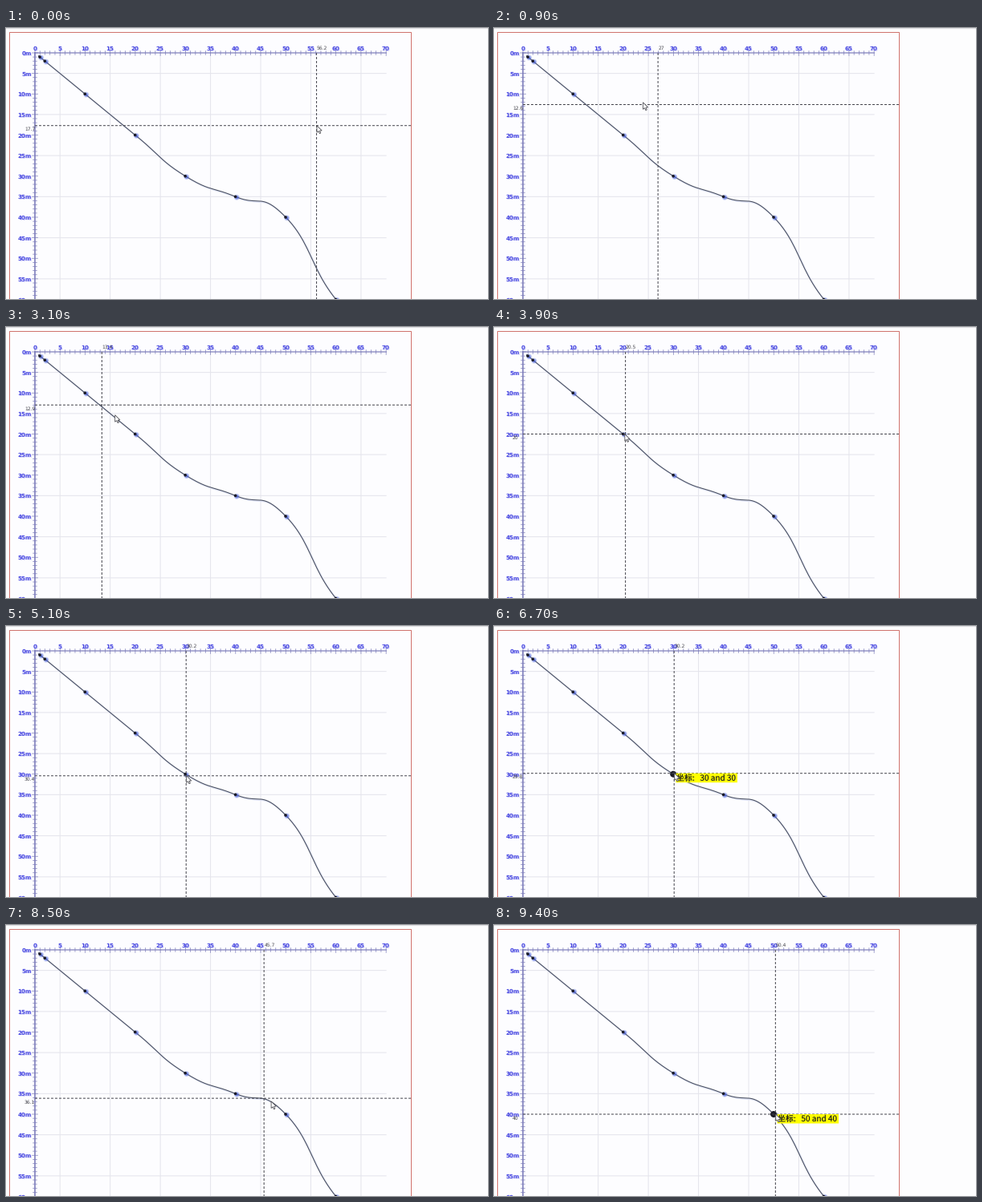
A matplotlib script for the animation above (9.5 s loop, 600 by 338 pixels).

```python
import matplotlib.pyplot as plt
import numpy as np
from matplotlib.animation import FuncAnimation
from matplotlib.patches import Circle, Polygon, Rectangle

plt.rcParams.update({"path.snap": False, "text.hinting": "no_hinting"})

W, H, DPI = 600, 338, 100
FRAMES, STEP = 95, 100
PX = 72 / DPI                     # points per pixel
X0, Y0, SX, SY = 36, 31, 6.245, 5.125
RIGHT = 504

BLUE, AXIS, INK = "#4a4ae2", "#7c7cba", "#46464e"
POINTS = np.array([(1, 1), (2, 2), (10, 10), (20, 20), (30, 30),
                   (40, 35), (50, 40), (60, 60), (70, 70)], float)

# Pointer moves: first frame, last frame, where it comes to rest
START = (56.2, 17.7)
MOVES = [(2, 19, 10.2, 9.65), (20, 23, 10.35, 10), (30, 36, 20.8, 20),
         (38, 41, 20.24, 20), (43, 44, 20.7, 20), (45, 51, 30.2, 30.4),
         (53, 57, 30.7, 30.8), (59, 62, 30.2, 29.9), (63, 64, 30.6, 30.2),
         (65, 67, 30.2, 29.8), (72, 79, 40.3, 35), (82, 91, 50.4, 40.4),
         (93, 94, 50.4, 40)]


def to_px(p):
    return np.asarray(p) * (SX, SY) + (X0, Y0)


def cardinal(pts, k=0.25, n=24):
    """Sample a cardinal spline through pts."""
    pad = np.vstack([pts[:1], pts, pts[-1:]])
    tan = k * (pad[2:] - pad[:-2])
    t = np.linspace(0, 1, n)[:, None]
    parts = [(1 - t)**3 * a + 3 * t * (1 - t)**2 * (a + ta)
             + 3 * t**2 * (1 - t) * (b - tb) + t**3 * b
             for a, b, ta, tb in zip(pts, pts[1:], tan, tan[1:])]
    return np.vstack(parts)


CURVE = cardinal(POINTS)


def curve_y(x):
    return np.interp(x, CURVE[:, 0], CURVE[:, 1])


def pointer(i):
    """Eased moves; those to the right run along the curve."""
    x, y = START
    for first, last, x1, y1 in MOVES:
        if i <= first:
            break
        e = 1 - (1 - min(1, (i - first) / (last - first))) ** 1.9
        nx, ny = x + (x1 - x) * e, y + (y1 - y) * e
        if x1 > x:
            ny += curve_y(nx) - (1 - e) * curve_y(x) - e * curve_y(x1)
        x, y = nx, ny
    return np.array([x, y])


def label(x, y, s, size, color, **kw):
    return ax.text(x, y, s, fontsize=size * PX, color=color, **kw)


def axis_label(x, y, s, ha):
    for shift, alpha in ((1, 0.22), (0, 1)):
        label(x + shift, y + 0.8 * shift, s, 7.1, BLUE, alpha=alpha,
              weight="bold", ha=ha, va="center_baseline")


def line(xs, ys, color, width=1.0, **kw):
    return ax.plot(xs, ys, color=color, lw=width * PX, **kw)[0]


fig = plt.figure(figsize=(W / DPI, H / DPI), dpi=DPI, facecolor="#fdfdfe")
ax = fig.add_axes([0, 0, 1, 1])
ax.set_xlim(0, W)
ax.set_ylim(H, 0)
ax.axis("off")

# Page edge and chart border
line([0, W], [0.5, 0.5], "#dcdcdf", 1.2)
ax.add_patch(Rectangle((4.5, 5.5), 500, 400, fc="#fdfdff", ec="#d0736d", lw=PX))

# Grid on every odd multiple of five
for v in range(5, 70, 10):
    gx, gy = to_px((v, v))
    line([gx, gx], [Y0, H], "#e5e5ec")
    line([X0, X0 + 70 * SX], [gy, gy], "#e5e5ec")

# Axes, ticks and their labels
line([X0, X0 + 70 * SX], [Y0, Y0], AXIS, 1.2)
line([X0, X0], [Y0, H], AXIS, 1.6)
for v in range(71):
    tx, ty = to_px((v, v))
    reach = 3.5 if v % 5 == 0 else 2.4
    line([tx, tx], [Y0 - reach, Y0 + reach], AXIS, 0.7)
    line([X0 - reach, X0 + reach], [ty, ty], AXIS, 0.7)
    if v % 5 == 0:
        axis_label(tx - 0.3, 25, v, "center")
        axis_label(31.8, ty + 0.3, f"{v}m", "right")

# Curve with a soft shadow, then its dots
spots = to_px(POINTS)
path = to_px(CURVE)
line(*(path + 1.2).T, "#e2e6f7", 1.8, zorder=3)
line(*path.T, "#4a5061", 1.1, zorder=3)
dots = []
for x, y in spots:
    for r, alpha in ((3.6, 0.18), (2.9, 0.3), (2.1, 0.45)):
        ax.add_patch(Circle((x + 1.4, y + 0.9), r, fc="#4a62dc", alpha=alpha, lw=0, zorder=4))
    dot = Circle((x - 0.2, y), 1.8, fc="#1b1b26", lw=0, zorder=5)
    dots.append(ax.add_patch(dot))

# Crosshair, tooltip and mouse arrow
dash = dict(ls=(0, (3, 2)), zorder=6)
hline = line([X0, RIGHT], [0, 0], INK, **dash)
vline = line([0, 0], [Y0, H], INK, **dash)
xval = label(0, 25, "", 6, INK, va="center_baseline", zorder=6)
yval = label(23, 0, "", 6, INK, va="center_baseline", zorder=6)
tip_box = ax.add_patch(Rectangle((0, 0), 76.5, 11.5, fc="#ffff00", lw=0, zorder=7))
tip_text = label(0, 0, "", 10, "#26261c", zorder=8, va="baseline",
                 family="Noto Sans CJK JP")
ARROW = np.array([(0, 0), (0, 8.6), (2, 6.9), (3.4, 9.9), (4.8, 9.2),
                  (3.5, 6.4), (6.2, 6.2)])
arrow = ax.add_patch(Polygon(ARROW, fc="white", ec="#4a4a50", lw=0.8 * PX, zorder=9))


def draw(i):
    pos = pointer(i)
    x, y = to_px(pos) - (0.4, 0)
    hline.set_ydata([y, y])
    vline.set_xdata([x, x])
    xval.set_x(x + 0.3)
    xval.set_text(f"{round(pos[0], 1):g}")
    yval.set_y(y + 4.3)
    yval.set_text(f"{round(pos[1], 1):g}")

    # The crosshair trails the arrow by one step while moving
    moving = i > 0 and np.any(pointer(i - 1) != pos)
    lead = pointer(min(i + 1, FRAMES - 1)) if moving else pos
    arrow.set_xy(ARROW + to_px(lead))

    near = np.all(np.abs(POINTS - pos) < (0.42, 0.38), axis=1)
    for dot, on in zip(dots, near):
        dot.set_radius(4 if on else 1.8)
    hit = near.any()
    tip_box.set_visible(hit)
    tip_text.set_visible(hit)
    if hit:
        px, py = POINTS[near][0]
        tip_box.set_xy((x + 2.2, y))
        tip_text.set_position((x + 2.8, y + 9.2))
        tip_text.set_text(f"坐标:   {px:g} and {py:g}")
    return hline, vline, xval, yval, tip_box, tip_text, arrow, *dots


anim = FuncAnimation(fig, draw, frames=FRAMES, interval=STEP,
                     repeat=True, repeat_delay=0, blit=False)
plt.show()
```
